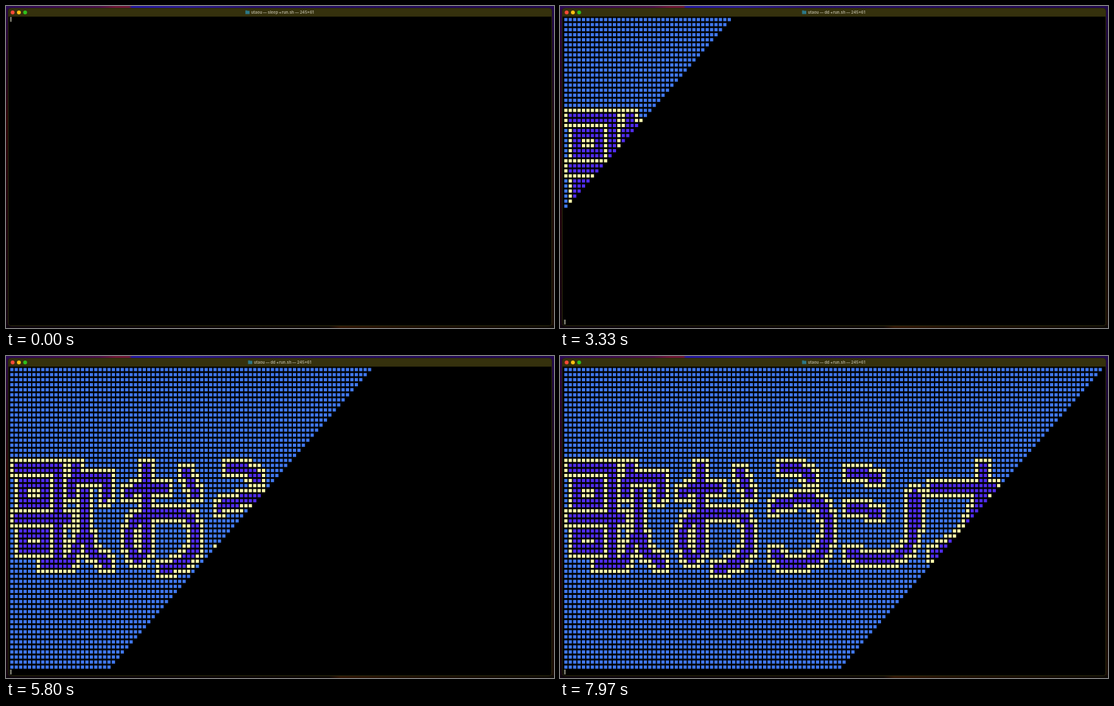
An HTML page with a canvas for the animation above (8 s loop, 850 px wide and 500 px high).

```html
<!DOCTYPE html>
<html lang="en">
<head>
<meta charset="utf-8">
<title>Terminal</title>
<style>
  html, body { margin: 0; width: 100%; height: 100%; overflow: hidden; background: #000; }
  canvas { display: block; }
</style>
</head>
<body>
<canvas id="stage" width="850" height="500"></canvas>
<script>
const ctx = document.getElementById('stage').getContext('2d');
const LOOP = 8000, COLS = 122, ROWS = 60;
const PITCH_X = 6.85, PITCH_Y = 7.83;
const DRAW_START = 1165, SWEEP_START = 1238, DIAGONAL_MS = 55;
const BLUE = '#4078ee', PURPLE = '#4f2cec', YELLOW = '#fdfbac';

// Lettering as brush strokes, measured in terminal cells.
const letters = [
  'M1.5 19.5H10.5V38.5H7.5 M1.5 29.5H12.5',
  'M2.5 22.5H7.5V26.5H2.5Z M2.5 32.5H7.5V35.5H2.5Z',
  'M14.5 19.5L13.5 24.5 M14.5 21.5H21.5V24.5L21 25.5',
  'M16.5 24.5V31L14.5 36L12.5 38.5 M16.5 31L18 36L21.5 38.5',
  'M30.5 19.5V35Q30 38 28 37Q25 33 28 30Q34 27 39 28.8Q42 30 41.6 34Q41 39 34 39.4',
  'M26.5 24.2L29 23.5H34.5 M39.5 20.5L41.5 24.5',
  'M49.5 19.4Q54 19.5 55.8 21.7',
  'M47 27.3Q51 25.7 55 25.7Q59.3 26.5 59.3 31.5Q59.5 38.5 50 38.6L47 36.5',
  'M64.5 20.4Q68 20.4 70.7 21.8 M64 27.4Q68 27.6 70.5 28.6',
  'M79 24.5V31Q78.5 37.5 71 37.5Q67 37.8 64.7 36.4',
  'M83.5 23.5H95.5L99 24.5 M94.5 19.5V37 M94 25Q92 34 83.5 36.5'
];
const strokes = new Path2D(letters.join(' '));

function buildCells() {
  ctx.save();
  ctx.lineWidth = 2;
  ctx.lineCap = ctx.lineJoin = 'round';
  const inked = Array.from({ length: ROWS }, (_, row) =>
    Array.from({ length: COLS }, (_, col) => ctx.isPointInStroke(strokes, col, row)));
  ctx.restore();
  const near = (row, col) => [-1, 0, 1].some(dy => [-1, 0, 1].some(dx => inked[row + dy]?.[col + dx]));
  return inked.map((line, row) => line.map((ink, col) => ink ? PURPLE : near(row, col) ? YELLOW : BLUE));
}
const cells = buildCells();

function rect(color, x, y, w, h) {
  ctx.fillStyle = color;
  ctx.fillRect(x, y, w, h);
}

function gradient(x2, y2, stops) {
  const fill = ctx.createLinearGradient(0, 0, x2, y2);
  stops.forEach(([at, color]) => fill.addColorStop(at, color));
  return fill;
}
const topEdge = gradient(850, 0, [[0, '#2c0a56'], [.17, '#4a1048'], [.2, '#701838'], [.225, '#701838'],
  [.23, '#2418a0'], [.33, '#2c1c90'], [.45, '#26106a'], [1, '#22084e']]);
const leftEdge = gradient(0, 500, [[0, '#2a0848'], [.22, '#240420'], [.35, '#300408'], [.6, '#22030c'], [1, '#120410']]);
const rightEdge = gradient(0, 500, [[0, '#22084e'], [.15, '#1a0630'], [.4, '#220c0c'], [1, '#1a0c04']]);
const bottomEdge = gradient(850, 0, [[0, '#0c040c'], [.59, '#0c0604'], [.61, '#301404'], [.72, '#201004'], [1, '#0c0804']]);

function drawTitle(command) {
  ctx.font = '700 6px Inter, "DejaVu Sans", sans-serif';
  ctx.textBaseline = 'middle';
  const text = `utaou — ${command} ◂ run.sh — 245×61`;
  const left = 429 - ctx.measureText(text).width / 2;
  ctx.fillStyle = '#aaa68e';
  ctx.fillText(text, left, 10);
  rect('#2c7888', left - 9, 7.5, 6.5, 5);
  rect('#2c7888', left - 9, 6.8, 3, 1);
}

function drawWindow(command) {
  rect('#000', 0, 0, 850, 500);
  rect(leftEdge, 0, 0, 4, 500);
  rect(rightEdge, 846, 0, 4, 500);
  rect(topEdge, 0, 0, 850, 4);
  rect(bottomEdge, 0, 496, 850, 4);
  ctx.fillStyle = '#000';
  ctx.beginPath();
  ctx.roundRect(3.5, 3.5, 843, 493, 4);
  ctx.fill();
  ctx.save();
  ctx.clip();
  rect('#35310d', 3, 3, 844, 13.5);
  ctx.restore();
  ctx.strokeStyle = '#2c2a0c';
  ctx.lineWidth = 1;
  ctx.stroke();
  ['#ff4a38', '#ffc012', '#30c01c'].forEach((color, i) => {
    ctx.fillStyle = color;
    ctx.beginPath();
    ctx.arc(10.3 + i * 9.7, 10, 3, 0, 7);
    ctx.fill();
  });
  drawTitle(command);
}

function draw(time) {
  const drawing = time >= DRAW_START;
  drawWindow(drawing ? 'dd' : 'sleep');
  rect('#6c6c60', 6, drawing ? 487 : 17, 3, 7.5);
  const count = Math.floor((time - SWEEP_START) / DIAGONAL_MS);
  for (let row = 0; row < ROWS; row++) {
    for (let col = 0; col < Math.min(COLS, count - row); col++) {
      rect(cells[row][col], 6.6 + col * PITCH_X, 18.6 + row * PITCH_Y, 5, 5);
    }
  }
}

const start = performance.now();
function tick() {
  draw((performance.now() - start) % LOOP);
  requestAnimationFrame(tick);
}
tick();
</script>
</body>
</html>
```
